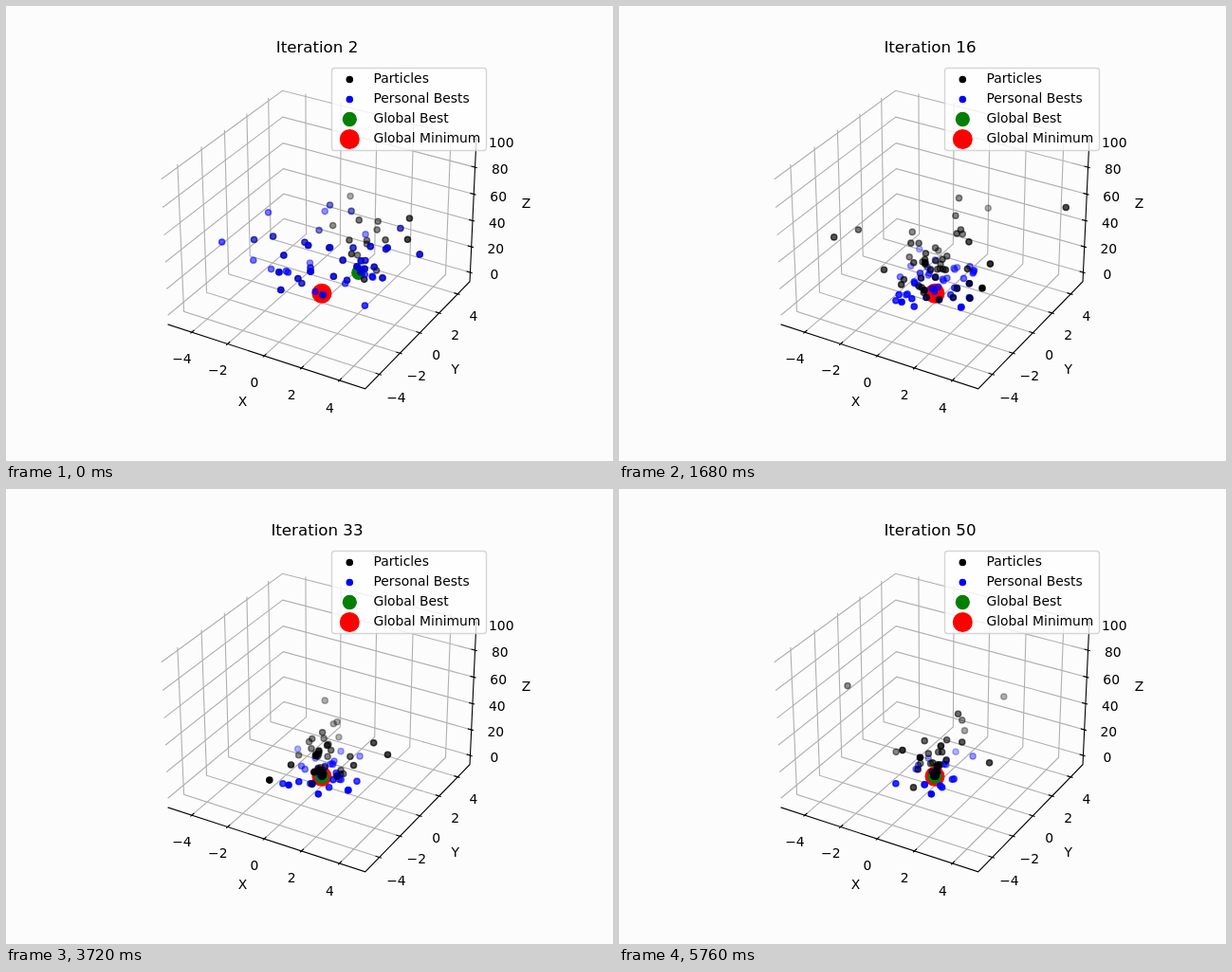
An HTML page that plays this animation: 640x480 px, repeating every 5.88 s.

```html
<!DOCTYPE html>
<html lang="en">
<head>
<meta charset="utf-8">
<title>Particle swarm</title>
<style>
  html, body { margin: 0; width: 100%; height: 100%; overflow: hidden; background: #fcfcfc; }
  svg { display: block; width: 640px; height: 480px; font: 13.89px "DejaVu Sans", sans-serif; }
  .grid { fill: none; stroke: #b0b0b0; stroke-width: 1.11; }
  .axis { fill: none; stroke: #000; stroke-width: 1.11; stroke-linecap: square; }
  .mid { text-anchor: middle; }
  #title { font-size: 16.67px; }
</style>
</head>
<body>
<svg viewBox="0 0 640 480">
  <g id="box"></g>
  <g id="dots"></g>
  <text id="title" class="mid" x="328" y="49"></text>
  <g id="legend">
    <rect x="343.5" y="65.5" width="163" height="87" rx="3" fill="#fff" fill-opacity=".8" stroke="#ccc" stroke-opacity=".8" stroke-width="1.39"/>
  </g>
</svg>
<script>
const STEP = 120, STEPS = 49, COUNT = 50;
const $ = id => document.getElementById(id);

// Data box: x and y run from -EDGE to EDGE, z from Z_LOW to Z_HIGH
const LIM = 5.12, PAD = 25 / 24, EDGE = LIM * PAD;
const Z_SPAN = 105 * PAD, Z_MID = 47.5, Z_LOW = Z_MID - Z_SPAN / 2, Z_HIGH = Z_MID + Z_SPAN / 2;

// Perspective camera, 30 degrees up and 60 degrees to the left
const HALF = PAD * 4 / 7, HEIGHT = PAD * 6 / 7;
const VIEW = { x: 333, y: 237.4, scale: 1997.8, dist: 10 };
const C = Math.sqrt(3) / 2;
const RIGHT = [C, .5, 0], UP = [-.25, C / 2, C], EYE = [C / 2, -.75, .5];
const dot = (a, b) => a[0] * b[0] + a[1] * b[1] + a[2] * b[2];

function project(x, y, z) {
  const p = [x / EDGE * HALF, y / EDGE * HALF, (z - Z_MID) / Z_SPAN * HEIGHT];
  const depth = dot(p, EYE), k = VIEW.scale / (VIEW.dist - depth);
  return { x: VIEW.x + k * dot(p, RIGHT), y: VIEW.y - k * dot(p, UP), depth };
}

const surface = (x, y) => 20 + x * x + y * y
  - 10 * (Math.cos(2 * Math.PI * x) + Math.cos(2 * Math.PI * y));
const onSurface = ([x, y]) => project(x, y, surface(x, y));

// Global best: ever closer valleys of the surface
const LEADERS = [
  { from: 0, at: [.95, 1.93] },
  { from: 4, at: [-1, .02] },
  { from: 11, at: [-.02, .03] },
  { from: 22, at: [0, 0] }
];
const leader = step => LEADERS.filter(l => l.from <= step).pop().at;

let seed = 20;
function rand() {
  seed = (seed * 1664525 + 1013904223) % 4294967296;
  return seed / 4294967296;
}

// Particle swarm: inertia plus random pulls to the personal and the global best
const INERTIA = .7, PULL = 1.7, START = 4.6;
const clip = v => Math.max(-LIM, Math.min(LIM, v));

function move(p, goal) {
  const vel = p.vel.map((v, k) => INERTIA * v
    + PULL * rand() * (p.best[k] - p.pos[k]) + PULL * rand() * (goal[k] - p.pos[k]));
  const pos = p.pos.map((x, k) => clip(x + vel[k]));
  return { pos, vel, best: surface(...pos) < surface(...p.best) ? pos : p.best };
}

function simulate() {
  let swarm = Array.from({ length: COUNT }, () => {
    const pos = [0, 1].map(() => START * (2 * rand() - 1));
    return { pos, vel: [0, 0], best: pos };
  });
  return Array.from({ length: STEPS }, (_, step) =>
    swarm = swarm.map(p => move(p, leader(step))));
}
const history = simulate();

const circle = (x, y, r, color, alpha = 1) =>
  `<circle cx="${x.toFixed(2)}" cy="${y.toFixed(2)}" r="${r}" fill="${color}" stroke="${color}" ` +
  `stroke-width="1.39" fill-opacity="${alpha.toFixed(3)}" stroke-opacity="${alpha.toFixed(3)}"/>`;
const R = { small: 3.1, best: 6.94, goal: 9.82 };

// Far points first and fainter
function cloud(places, r, color) {
  const pts = places.map(onSurface).sort((a, b) => a.depth - b.depth);
  const far = pts[0].depth, near = pts[pts.length - 1].depth;
  const shade = d => near > far ? .3 + .7 * (d - far) / (near - far) : 1;
  return { near, html: pts.map(p => circle(p.x, p.y, r, color, shade(p.depth))).join("") };
}

function drawBox() {
  const path = (cls, ...pts) => `<path class="${cls}" d="M${pts.map(p => {
    const q = project(...p);
    return q.x.toFixed(2) + " " + q.y.toFixed(2);
  }).join("L")}"/>`;
  const text = (s, dy, ...p) => {
    const q = project(...p);
    return `<text class="mid" x="${q.x.toFixed(1)}" y="${Math.round(q.y + dy)}">${String(s).replace("-", "\u2212")}</text>`;
  };
  const E = EDGE, unit = .08 * 2 * E, zUnit = .08 * Z_SPAN;
  const inner = E - .2 * unit, outer = E + .1 * unit;
  const tick = { out: E + 1.037 * unit, low: Z_LOW - 1.037 * zUnit, dy: 10.6 };
  const name = { out: E + 2.255 * unit, low: Z_LOW - 2.255 * zUnit, dy: 4.2 };
  let grid = "", axis = "", labels = "";
  for (let v = -4; v <= 4; v += 2) {
    grid += path("grid", [v, -E, Z_LOW], [v, E, Z_LOW], [v, E, Z_HIGH]);
    grid += path("grid", [E, v, Z_LOW], [-E, v, Z_LOW], [-E, v, Z_HIGH]);
    axis += path("axis", [v, -inner, Z_LOW], [v, -outer, Z_LOW]);
    axis += path("axis", [inner, v, Z_LOW], [outer, v, Z_LOW]);
    labels += text(v, tick.dy, v, -tick.out, tick.low) + text(v, tick.dy, tick.out, v, tick.low);
  }
  for (let v = 0; v <= 100; v += 20) {
    grid += path("grid", [E, E, v], [-E, E, v], [-E, -E, v]);
    axis += path("axis", [inner, E, v], [outer, E, v]);
    labels += text(v, tick.dy, tick.out, tick.out, v);
  }
  axis += path("axis", [-E, -E, Z_LOW], [E, -E, Z_LOW], [E, E, Z_LOW], [E, E, Z_HIGH]);
  labels += text("X", name.dy, 0, -name.out, name.low) + text("Y", name.dy, name.out, 0, name.low)
    + text("Z", name.dy, name.out, name.out, Z_MID);
  $("box").innerHTML = grid + axis + labels;
}

function drawLegend() {
  const rows = [["Particles", R.small, "black"], ["Personal Bests", R.small, "blue"],
    ["Global Best", R.best, "green"], ["Global Minimum", R.goal, "red"]];
  $("legend").innerHTML += rows.map(([name, r, color], i) =>
    circle(362.3, 77.5 + 21 * i, r, color) + `<text x="387.4" y="${81 + 21 * i}">${name}</text>`).join("");
}

function drawStep(step) {
  const swarm = history[step];
  const clouds = [
    cloud([[0, 0]], R.goal, "red"),
    cloud([leader(step)], R.best, "green"),
    cloud(swarm.map(p => p.pos), R.small, "black"),
    cloud(swarm.map(p => p.best), R.small, "blue")
  ].sort((a, b) => a.near - b.near);
  $("dots").innerHTML = clouds.map(c => c.html).join("");
  $("title").textContent = "Iteration " + (step + 2);
}

let shown = -1;
function frame() {
  const step = Math.floor(performance.now() / STEP) % STEPS;
  if (step !== shown) drawStep(shown = step);
  requestAnimationFrame(frame);
}

drawBox();
drawLegend();
frame();
</script>
</body>
</html>
```
